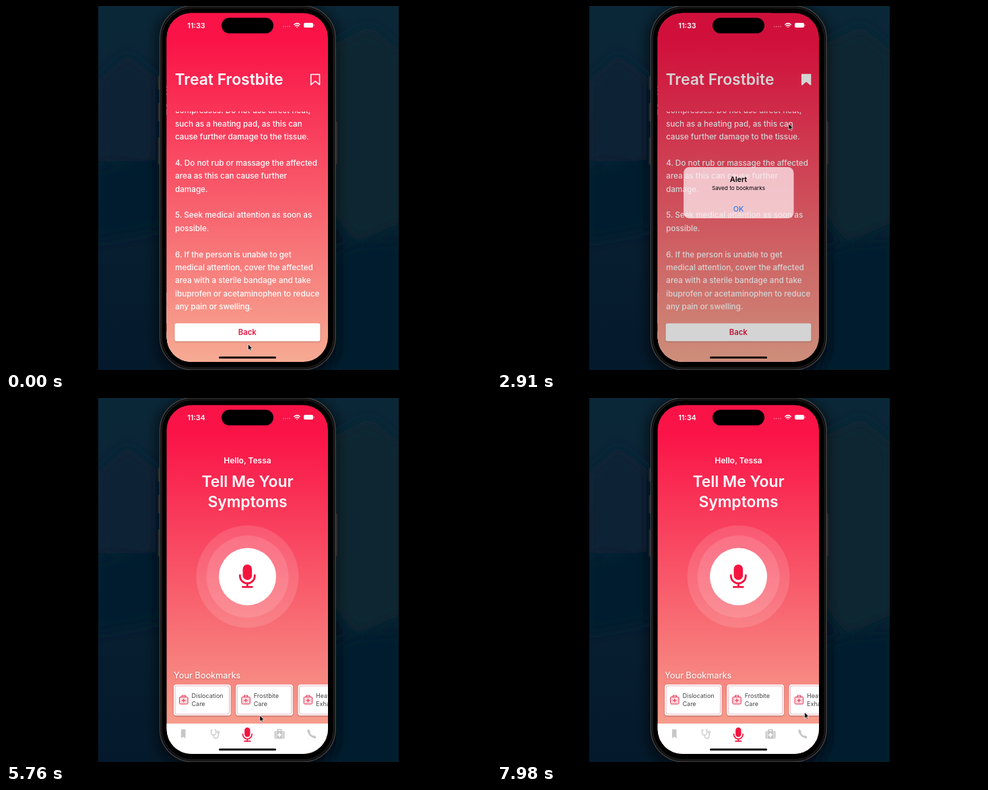
An HTML page that plays this animation: 720 px wide and 540 px high, repeating every 8 s.

```html
<!DOCTYPE html>
<html lang="en">
<head>
<meta charset="utf-8">
<title>Treat Frostbite</title>
<style>
html, body { margin: 0; height: 100%; overflow: hidden; background: #000; }
svg { display: block; width: 100vw; height: 100vh; font-family: Inter, "Open Sans", sans-serif; }
.mid { text-anchor: middle; }
.title { font-size: 22.9px; font-weight: 600; fill: #fff; }
.steps { font-size: 11.7px; font-weight: 500; fill: #fff; }
.card text { font-size: 9px; fill: #444; }
.line { fill: none; stroke-linecap: round; stroke-linejoin: round; }
</style>
</head>
<body>
<svg viewBox="0 0 720 540">
  <defs>
    <linearGradient id="sky" x2="0" y2="1">
      <stop offset="0" stop-color="#0a2738"/><stop offset=".25" stop-color="#0b2536"/>
      <stop offset=".6" stop-color="#071f30"/><stop offset="1" stop-color="#041a2c"/>
    </linearGradient>
    <linearGradient id="red" x2="0" y2="1">
      <stop offset=".08" stop-color="#fa1347"/><stop offset="1" stop-color="#f6ab93"/>
    </linearGradient>
    <filter id="soft" x="-50%" y="-50%" width="200%" height="200%"><feGaussianBlur stdDeviation="9"/></filter>
    <filter id="shade" x="-10%" y="-20%" width="120%" height="150%">
      <feDropShadow dx="0" dy="1" stdDeviation="1" flood-opacity=".28"/>
    </filter>
    <clipPath id="wall"><rect x="137" width="446" height="540"/></clipPath>
    <clipPath id="glass"><rect x="238.500" y="10.500" width="239.500" height="517.500" rx="37"/></clipPath>
    <clipPath id="scroll"><rect x="238" y="156.500" width="241" height="305"/></clipPath>
    <g id="mic">
      <rect x="-6.8" y="-18" width="13.6" height="23" rx="6.8" fill="#f5143f"/>
      <path class="line" stroke="#f5143f" stroke-width="2.8" d="M-11-2v1a11 11 0 0 0 22 0v-1M0 10v5M-7 15.300h14"/>
    </g>
  </defs>

  <g clip-path="url(#wall)">
    <rect x="137" width="446" height="540" fill="url(#sky)"/>
    <g filter="url(#soft)">
      <path d="M137 110L180 72L240 120V230H137Z" fill="#0b2334"/>
      <path d="M480 60L540 30L590 70V320L520 350L480 300Z" fill="#0e2731"/>
      <path d="M130 240L240 225V330L130 350Z" fill="#061c2d"/>
      <path d="M480 360L590 345V550H480Z" fill="#061c2d"/>
      <rect x="222" y="0" width="273" height="550" rx="48" fill-opacity=".5"/>
    </g>
  </g>

  <g fill="#2b2a2b">
    <rect x="225.500" y="104" width="4" height="20" rx="1"/>
    <rect x="225.500" y="144" width="4" height="27" rx="1"/>
    <rect x="225.500" y="195" width="4" height="40" rx="1"/>
    <rect x="488" y="171" width="4" height="64" rx="1"/>
  </g>
  <rect x="228.500" y="0" width="260.500" height="539.500" rx="48" fill="#000" stroke="#444041" stroke-width="1.500"/>
  <rect x="231" y="2.500" width="255.500" height="534.500" rx="46" fill="none" stroke="#1b1a1b" stroke-width="2"/>

  <g clip-path="url(#glass)">
    <g id="home">
      <rect x="238" y="10" width="241" height="519" fill="url(#red)"/>
      <g id="spinner" stroke="#5a1230" stroke-width="1.700" stroke-linecap="round"></g>
      <g id="pull" class="mid">
        <text x="358.500" y="97" font-size="12" font-weight="600" fill="#fff">Hello, Tessa</text>
        <text class="title" x="358.500" y="131.800">Tell Me Your</text>
        <text class="title" x="358.500" y="162">Symptoms</text>
        <g fill="#fff">
          <circle cx="358.500" cy="265" r="76" fill-opacity=".13"/>
          <circle cx="358.500" cy="265" r="61" fill-opacity=".13"/>
          <circle cx="358.500" cy="265" r="42.500"/>
        </g>
        <use href="#mic" x="358.300" y="265"/>
      </g>
      <text x="249" y="415.800" font-size="12.800" fill="#fff" filter="url(#shade)">Your Bookmarks</text>
      <g id="cards"></g>
      <rect x="238" y="483" width="241" height="46" fill="#fff"/>
      <path d="M260 491.500h6.500v13.500l-3.250-2.500l-3.250 2.500z" fill="#c6c6c6"/>
      <g class="line" stroke="#c6c6c6" stroke-width="1.300">
        <path d="M306 492.500h-1.500v4a3.600 3.600 0 0 0 7.200 0v-4h-1.500M308.100 500v1.500a3.500 3.500 0 0 0 7 0v-4"/>
        <circle cx="315.100" cy="495.800" r="1.500"/>
      </g>
      <use href="#mic" transform="translate(358.300 499.800) scale(.61)"/>
      <rect x="398.500" y="494" width="15" height="11.500" rx="1.500" fill="#c6c6c6"/>
      <path class="line" stroke="#c6c6c6" stroke-width="1.500" d="M403 494v-2h6v2"/>
      <path d="M401 494v11.500M411 494v11.500" stroke="#fff" stroke-width=".8"/>
      <path d="M403 499.700h6M406 496.700v6" stroke="#fff" stroke-width="2"/>
      <g class="line" stroke="#c6c6c6">
        <path stroke-width="2.600" d="M449 494.500Q450.500 501.500 457.800 503.200"/>
        <path stroke-width="3.400" d="M449 493.500l1 2.300M456.300 502.300l2.300.9"/>
      </g>
    </g>

    <g id="detail">
      <rect x="238" y="10" width="241" height="519" fill="url(#red)"/>
      <text class="title" x="250.500" y="116.500">Treat Frostbite</text>
      <path id="mark" d="M452.700 101.500H465.500V116.800L459.100 111.500L452.700 116.800Z" stroke="#fff" stroke-width="1.600" stroke-linejoin="round"/>
      <g clip-path="url(#scroll)"><text id="steps" class="steps"></text></g>
      <g id="back">
        <rect x="250.500" y="470.800" width="215.800" height="26.500" rx="2.500" fill="#fff" filter="url(#shade)"/>
        <text class="mid" x="358.300" y="488" font-size="11.300" font-weight="600" fill="#e5173f">Back</text>
      </g>
    </g>

    <rect id="dim" x="238" y="10" width="241" height="519"/>
    <g id="alert" class="mid">
      <rect x="277" y="239" width="163.500" height="76" rx="8.500" fill="#fff0f5" fill-opacity=".73"/>
      <text x="358.500" y="261" font-size="10.800" font-weight="600">Alert</text>
      <text x="358.500" y="273.300" font-size="8.200">Saved to bookmarks</text>
      <text x="358.500" y="305" font-size="10.800" fill="#0a72f5">OK</text>
    </g>
    <rect x="316" y="520" width="85" height="3" rx="1.500" fill="#080304"/>
  </g>

  <rect x="320" y="17.500" width="77" height="23" rx="11.500"/>
  <text id="clock" class="mid" x="282.500" y="32.500" font-size="10.800" font-weight="600" fill="#fff"></text>
  <path d="M411 30.500h11" stroke="#fff" stroke-opacity=".4" stroke-width="1.600" stroke-dasharray="1.600 1.500"/>
  <g class="line" stroke="#fff" stroke-width="1.600">
    <path d="M427.800 27.500q4.200-3.600 8.400 0M429.500 29.500q2.500-2 5 0M431.900 31.300h.2"/>
  </g>
  <rect x="442" y="25" width="14" height="7" rx="2" fill="#fff"/>
  <path d="M457.300 27.300v2.400" stroke="#fff" stroke-opacity=".6"/>

  <path id="cursor" d="M0 0V9.200L2.100 7.300L3.500 10.400L5 9.700L3.700 6.700H6.500Z" fill="#000" stroke="#fff" stroke-width=".7"/>
</svg>

<script>
const LOOP = 8000;
const $ = id => document.getElementById(id);
const clamp = v => Math.min(1, Math.max(0, v));
const ramp = (t, a, b) => clamp((t - a) / (b - a));
const ease = k => k * k * (3 - 2 * k);
const easeOut = k => 1 - (1 - k) ** 3;

const lines = [
  "compresses. Do not use direct heat,", "such as a heating pad, as this can",
  "cause further damage to the tissue.", "",
  "4. Do not rub or massage the affected", "area as this can cause further", "damage.", "",
  "5. Seek medical attention as soon as", "possible.", "",
  "6. If the person is unable to get", "medical attention, cover the affected",
  "area with a sterile bandage and take", "ibuprofen or acetaminophen to reduce",
  "any pain or swelling."
];
$("steps").innerHTML = lines.map((s, i) =>
  `<tspan x="251" y="${159.2 + i * 19.4}">${s}</tspan>`).join("");

const cards = [["Dislocation", "Care"], ["Frostbite", "Care"], ["Heat", "Exhaustion"]];
$("cards").innerHTML = cards.map(([a, b], i) => `
  <g class="card" transform="translate(${249 + i * 92.3} 425)">
    <rect width="84.500" height="46" rx="4" fill="#fff" filter="url(#shade)"/>
    <rect x="2" y="2" width="80.500" height="42" rx="2.500" fill="none" stroke="#dfa3ae" stroke-width=".8"/>
    <rect x="8.500" y="18.500" width="12.500" height="10.500" rx="1.500" fill="#fbd5dc" stroke="#e5304f"/>
    <path d="M12.300 18.500v-2.300h5v2.300M14.750 21v5.500M12 23.750h5.500" fill="none" stroke="#e5304f" stroke-width="1.100"/>
    <text x="26.500" y="20.300">${a}</text><text x="26.500" y="31.800">${b}</text>
  </g>`).join("");

$("spinner").innerHTML = Array.from({ length: 8 }, (_, i) =>
  `<path d="M0-4.500V-8.200" transform="rotate(${i * 45})"/>`).join("");
const spokes = [...$("spinner").children];

// Pointer path: time, x, y. A repeated place is a rest.
const path = [
  [0, 359.3, 501.5], [480, 359.3, 501.5], [1275, 494, 390], [2120, 462.5, 101.5], [2480, 462.5, 101.5],
  [3100, 415, 215], [3700, 363.5, 306], [3960, 363.5, 306], [4600, 372, 410], [5180, 368.5, 484],
  [5330, 368.5, 484], [5760, 376.5, 471], [6090, 518, 250], [6150, 504, 215], [6420, 448, 125],
  [6500, 448, 125], [6960, 463.5, 497], [7080, 463.5, 497], [7760, 458, 468], [7980, 456.5, 466], [LOOP, 456.5, 466]
];

function slope(i, c) {
  const p = path[i - 1], k = path[i], n = path[i + 1];
  if (!p || !n || p[c] === k[c] || n[c] === k[c]) return 0;
  return (n[c] - p[c]) / (n[0] - p[0]);
}

function along(t, c) {
  const i = Math.max(0, path.findIndex(k => k[0] > t) - 1);
  const a = path[i], b = path[i + 1], d = b[0] - a[0], u = (t - a[0]) / d, v = 1 - u;
  return v * v * (1 + 2 * u) * a[c] + u * u * (3 - 2 * u) * b[c]
    + d * u * v * (v * slope(i, c) - u * slope(i + 1, c));
}

const move = (el, x, y) => el.setAttribute("transform", `translate(${x} ${y})`);

function draw(t) {
  $("clock").textContent = t < 4530 ? "11:33" : "11:34";
  $("mark").setAttribute("fill", t < 2450 ? "none" : "#fff");

  const shown = ease(ramp(t, 2520, 2780)) * (1 - ease(ramp(t, 3960, 4200)));
  const zoom = t < 3500 ? 1.15 - .15 * shown : 1;
  $("dim").setAttribute("opacity", .17 * shown);
  $("alert").setAttribute("opacity", shown);
  $("alert").setAttribute("transform", `translate(358.5 277) scale(${zoom}) translate(-358.5 -277)`);

  $("back").setAttribute("opacity", 1 - .7 * ramp(t, 5285, 5340));
  const pop = easeOut(ramp(t, 5340, 5730));
  move($("detail"), 241 * pop, 0);
  move($("home"), -72 * (1 - pop), 0);

  const pull = 177 * ease(ramp(t, 6500, 6960)) * (1 - ease(ramp(t, 7080, 7720)));
  move($("pull"), 0, pull);
  move($("spinner"), 358.5, 59 + pull * .43);
  $("spinner").setAttribute("opacity", ramp(pull, 10, 90));
  const turn = Math.floor(t / 100);
  spokes.forEach((s, i) => s.setAttribute("opacity", .25 + .6 * ((i - turn + 80) % 8) / 7));

  move($("cursor"), along(t, 1), along(t, 2));
}

function tick(now) {
  draw(now % LOOP);
  requestAnimationFrame(tick);
}
tick(performance.now());
</script>
</body>
</html>
```
